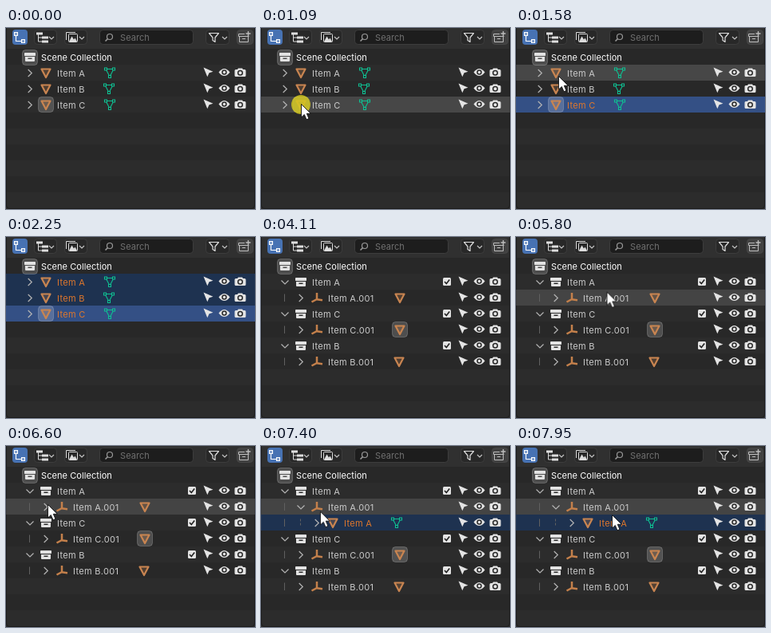
Recreate the animation shown at these times as an HTML page. Size 312 by 227 pixels, loop 8 s.

```html
<!DOCTYPE html>
<html lang="en">
<head>
<meta charset="utf-8">
<title>Outliner</title>
<style>
html, body { margin: 0; width: 100%; height: 100%; overflow: hidden; background: #282828; }
svg { display: block; }
text { font: 11px Inter, "Open Sans", sans-serif; letter-spacing: .3px; fill: #cbcbcb; }
.tight { letter-spacing: .07px; }

.flat, .nested, .closed, .open, .tail, .selC, .selAB, .txtC, .txtAB, .hover, .press, .seen, .move {
  animation: 8s step-end infinite;
}
.flat { animation-name: flat; }
.nested { animation-name: nested; }
.closed { animation-name: closed; }
.open { animation-name: open; }
.tail { animation-name: tail; }
.selC { animation-name: selC; }
.selAB { animation-name: selAB; }
.txtC { animation-name: txtC; }
.txtAB { animation-name: txtAB; }
.hover { animation-name: hover; }
.press { animation-name: press; }
.seen { animation-name: seen; }
.move { animation-name: move; }

@keyframes flat { 0% { opacity: 1 } 51.375%, 100% { opacity: 0 } }
@keyframes nested { 0% { opacity: 0 } 51.375%, 100% { opacity: 1 } }
@keyframes closed { 0% { opacity: 1 } 85.75%, 100% { opacity: 0 } }
@keyframes open { 0% { opacity: 0 } 85.75%, 100% { opacity: 1 } }
@keyframes tail { 0% { transform: none } 85.75%, 100% { transform: translateY(20px) } }
@keyframes selC { 0% { opacity: 0 } 14.375% { opacity: 1 } 51.375%, 100% { opacity: 0 } }
@keyframes selAB { 0% { opacity: 0 } 23.875% { opacity: 1 } 51.375%, 100% { opacity: 0 } }
@keyframes txtC { 0% { fill: #cbcbcb } 14.375%, 100% { fill: #de772c } }
@keyframes txtAB { 0% { fill: #cbcbcb } 23.875%, 100% { fill: #de772c } }

/* highlighted row under the pointer */
@keyframes hover {
  0% { opacity: 0; transform: translateY(86px) }
  6.7% { opacity: 1; transform: translateY(86px) }
  16.1% { opacity: 1; transform: translateY(66px) }
  18.1% { opacity: 1; transform: translateY(46px) }
  27.25% { opacity: 0; transform: translateY(46px) }
  56.375% { opacity: 1; transform: translateY(66px) }
  57.25% { opacity: 0; transform: translateY(66px) }
  60.625% { opacity: 1; transform: translateY(126px) }
  61.375% { opacity: 1; transform: translateY(46px) }
  69% { opacity: 1; transform: translateY(66px) }
  93% { opacity: 1; transform: translateY(86px) }
  99.375%, 100% { opacity: 1; transform: translateY(66px) }
}
@keyframes press {
  0% { opacity: 0 }
  13.625% { opacity: 1 } 14.375% { opacity: 0 }
  22.25% { opacity: 1 } 23.875% { opacity: 0 }
  84.125% { opacity: 1 } 85.75%, 100% { opacity: 0 }
}
@keyframes seen {
  0% { opacity: 0 }
  1.625% { opacity: 1 } 28.125% { opacity: 0 }
  55.5% { opacity: 1 } 57.25% { opacity: 0 }
  59.75%, 100% { opacity: 1 }
}
@keyframes move {
  0% { transform: translate(104px, 212px) }
  1.625% { transform: translate(104px, 212px); animation-timing-function: ease-out }
  11.125% { transform: translate(50px, 95px) }
  14.375% { transform: translate(50px, 95px); animation-timing-function: ease-in-out }
  19.75% { transform: translate(53px, 60px) }
  27.25% { transform: translate(84px, 6px) }
  55.5% { transform: translate(215px, 184px) }
  56.375% { transform: translate(188px, 80px) }
  59.75% { transform: translate(165px, 3px) }
  60.625% { transform: translate(156px, 140px) }
  61.375% { transform: translate(141px, 62px) }
  69% { transform: translate(139px, 67px); animation-timing-function: ease-in-out }
  78.25% { transform: translate(54px, 72px); animation-timing-function: ease-out }
  82.5% { transform: translate(52px, 73px) }
  89.125% { transform: translate(52px, 73px); animation-timing-function: ease-in }
  94% { transform: translate(92px, 89px); animation-timing-function: ease-out }
  98.5% { transform: translate(120px, 88px) }
  99.375%, 100% { transform: translate(120px, 86px) }
}
</style>
</head>
<body>
<svg width="312" height="227" viewBox="0 0 312 227">
  <defs>
    <pattern id="stripes" y="26" width="312" height="40" patternUnits="userSpaceOnUse">
      <rect width="312" height="20" fill="#282828"/>
      <rect y="20" width="312" height="20" fill="#2c2c2c"/>
    </pattern>

    <!-- icons are centred on 0,0 -->
    <path id="right" d="M-2.300-4.500 2.300 0-2.300 4.500" fill="none" stroke="#b4b4b4" stroke-width="1.200"/>
    <path id="down" d="M-4.500-2 0 2.500 4.500-2" fill="none" stroke="#b4b4b4" stroke-width="1.200"/>
    <path id="drop" d="M-3-1.500 0 1.500 3-1.500" fill="none" stroke="#c4c4c4" stroke-width="1.200"/>
    <path id="mesh" d="M-5.500-5H5.500L0 5.500Z" fill="#c4804b" fill-opacity=".25" stroke="#c98551" stroke-width="2.200" stroke-linejoin="round"/>
    <rect id="badge" x="-9.500" y="-9.500" width="19" height="19" rx="4" fill="#fff" fill-opacity=".18" stroke="#fff" stroke-opacity=".2"/>
    <g id="data" fill="none" stroke="#0fbf92" stroke-width="1.100">
      <path d="M-3.500-4.500H3.500M-4.200-3-.8 3.500M4.200-3 .8 3.500"/>
      <path d="M-6.500-6h3v3h-3zM3.500-6h3v3h-3zM-1.500 3.500h3v3h-3z"/>
    </g>
    <path id="axes" d="M0-6.500V1.500L-6.500 5M0 1.700 7 2.700" fill="none" stroke="#c4804b" stroke-width="2.500"/>
    <g id="box" fill="#e2e2e2">
      <rect x="-7" y="-5.500" width="14" height="4" rx=".8"/>
      <path d="M-6-.5H6V4.500Q6 5.500 5 5.500H-5Q-6 5.500-6 4.500ZM-2.500 1V2.500H2.500V1Z" fill-rule="evenodd"/>
    </g>
    <g id="toggles" fill="#e4e4e4" transform="translate(0 -.5)">
      <path d="M247.500-6.500 259.500-1.300 254.600.2 252.300 5.300Z"/>
      <path d="M266.500-.500Q273.500-9.500 280.500-.500 273.500 8.500 266.500-.500Z"/>
      <circle cx="273.500" cy="-.5" r="2.500" fill="none" stroke="#2a2a2a" stroke-width="1.500"/>
      <path d="M288-4H290L291-5.500H296L297-4H299Q300.500-4 300.500-2.500V3.500Q300.500 5 299 5H288Q286.500 5 286.500 3.500V-2.500Q286.500-4 288-4Z"/>
      <circle cx="293.500" cy=".3" r="2.800" fill="none" stroke="#2a2a2a" stroke-width="1.500"/>
    </g>
    <g id="check">
      <rect x="228" y="-5.500" width="10" height="10" rx="1.500" fill="#e4e4e4"/>
      <path d="M230-.5 232.300 2 236.200-3" fill="none" stroke="#222" stroke-width="1.600"/>
    </g>
    <path id="guide" d="M0-5V4.500" stroke="#606060"/>
    <g id="coll">
      <use href="#down" x="30"/><use href="#box" x="50"/>
      <use href="#check"/><use href="#toggles"/>
    </g>
    <g id="empty">
      <use href="#guide" x="29.500"/><use href="#axes" x="70"/><use href="#toggles"/>
    </g>
    <g id="object">
      <use href="#right" x="30"/><use href="#mesh" x="50"/><use href="#toggles"/>
    </g>
    <g id="tree" fill="#ddd">
      <path d="M-4.500-4V5H1M-4.500 0H1" fill="none" stroke="#ddd"/>
      <path d="M-7-6.500h8v3h-8zM0-1.500h8v3h-8zM0 3.500h8v3h-8z"/>
    </g>
  </defs>

  <rect width="312" height="227" fill="url(#stripes)"/>
  <rect width="312" height="26" fill="#303030"/>
  <path d="M.5 0V222Q.5 226.500 5 226.500H307Q311.500 226.500 311.500 222V0" fill="none" stroke="#191919"/>

  <!-- header -->
  <rect x="8" y="2" width="19" height="19" rx="4" fill="#4772b3"/>
  <g fill="none" stroke="#fff" stroke-width="1.100">
    <path d="M12.500 9.500V16.500H19"/>
    <path d="M10.500 5.500h4v4h-4zM19.500 14.500h4v4h-4z" fill="#fff" fill-opacity=".3"/>
  </g>
  <g fill="#282828" stroke="#3d3d3d">
    <rect x="35.500" y="2.500" width="28" height="18" rx="4"/>
    <rect x="73.500" y="2.500" width="28" height="18" rx="4"/>
    <rect x="117.500" y="2.500" width="117" height="18" rx="4" fill="#1d1d1d"/>
    <rect x="250.500" y="2.500" width="29" height="18" rx="4"/>
    <rect x="289.500" y="2.500" width="20" height="18" rx="4" fill="#414141" stroke="#484848"/>
  </g>
  <use href="#tree" x="45" y="12"/>
  <use href="#drop" x="57" y="12.500"/>
  <path d="M75.500 15V5.500H87" fill="none" stroke="#ddd"/>
  <rect x="78.500" y="7.500" width="11" height="10" rx="1" fill="none" stroke="#ddd"/>
  <path d="M79 17 82.500 10.500 85 14.500 86.500 12.500 89 17Z" fill="#ddd"/>
  <use href="#drop" x="95" y="12.500"/>
  <circle cx="130" cy="11" r="3.500" fill="none" stroke="#999" stroke-width="1.200"/>
  <path d="M127.500 13.500 124.500 16.500" stroke="#999" stroke-width="1.600"/>
  <text class="tight" x="143" y="16" style="fill:#707070">Search</text>
  <path d="M254.500 6.500H266.500L262 12V17.500L259 15.500V12Z" fill="none" stroke="#ddd" stroke-width="1.200" stroke-linejoin="round"/>
  <use href="#drop" x="274" y="12.500"/>
  <g fill="none" stroke="#bdbdbd">
    <path d="M299 7.500H291.500V10.500H304.500M292.500 10.500V17.500H303.500V10.500M296 13.500H300"/>
    <path d="M303.500 4V10M300.500 7H306.500" stroke-width="1.400"/>
  </g>

  <!-- row backgrounds -->
  <g class="selAB"><rect y="46" width="312" height="40" fill="#1e3250"/></g>
  <g class="selC"><rect y="86" width="312" height="20" fill="#345085"/></g>
  <g class="open"><rect y="86" width="312" height="20" fill="#1e3250"/></g>
  <rect class="hover" width="312" height="20" fill="#fff" fill-opacity=".13"/>

  <use href="#badge" x="30" y="37"/>
  <use href="#box" x="30" y="36.500"/>
  <text class="tight" x="44" y="41" style="fill:#fff">Scene Collection</text>

  <g class="flat">
    <use href="#object" y="56.500"/><use href="#data" x="130" y="56"/>
    <use href="#object" y="76.500"/><use href="#data" x="129" y="76"/>
    <use href="#badge" x="50" y="96"/>
    <use href="#object" y="96.500"/><use href="#data" x="130" y="96"/>
    <text class="txtAB" x="64" y="61">Item A</text>
    <text class="txtAB" x="64" y="81">Item B</text>
    <text class="txtC" x="64" y="101">Item C</text>
  </g>

  <g class="nested">
    <use href="#coll" y="56.500"/><text x="64" y="61">Item A</text>
    <use href="#empty" y="76.500"/><text x="84" y="81">Item A.001</text>
    <g class="closed">
      <use href="#right" x="50" y="76.500"/>
      <use href="#mesh" x="174" y="76.500"/>
    </g>
    <g class="open">
      <use href="#down" x="50" y="76.500"/>
      <use href="#guide" x="29.500" y="96.500"/>
      <path d="M49.500 91.500V101" stroke="#606060" stroke-dasharray="3 2"/>
      <use href="#right" x="70" y="96.500"/>
      <use href="#mesh" x="90" y="96.500"/>
      <text x="104" y="101" style="fill:#de772c">Item A</text>
      <use href="#data" x="170" y="96"/>
      <use href="#toggles" y="96.500"/>
    </g>
    <g class="tail">
      <use href="#coll" y="96.500"/><text x="64" y="101">Item C</text>
      <use href="#empty" y="116.500"/><use href="#right" x="50" y="116.500"/>
      <text x="84" y="121">Item C.001</text>
      <use href="#badge" x="174" y="116"/><use href="#mesh" x="174" y="116.500"/>
      <use href="#coll" y="136.500"/><text x="64" y="141">Item B</text>
      <use href="#empty" y="156.500"/><use href="#right" x="50" y="156.500"/>
      <text x="84" y="161">Item B.001</text>
      <use href="#mesh" x="173" y="156.500"/>
    </g>
  </g>

  <!-- pointer -->
  <g class="seen">
    <g class="move">
      <circle class="press" cy="1" r="12" fill="#d8cc1c" fill-opacity=".8"/>
      <path d="M.5.5V17L4.300 13.500 7 19.800 10 18.500 7.300 12.300H12.300Z" fill="#fff" stroke="#111" stroke-width=".9" stroke-linejoin="round"/>
    </g>
  </g>
</svg>
</body>
</html>
```
